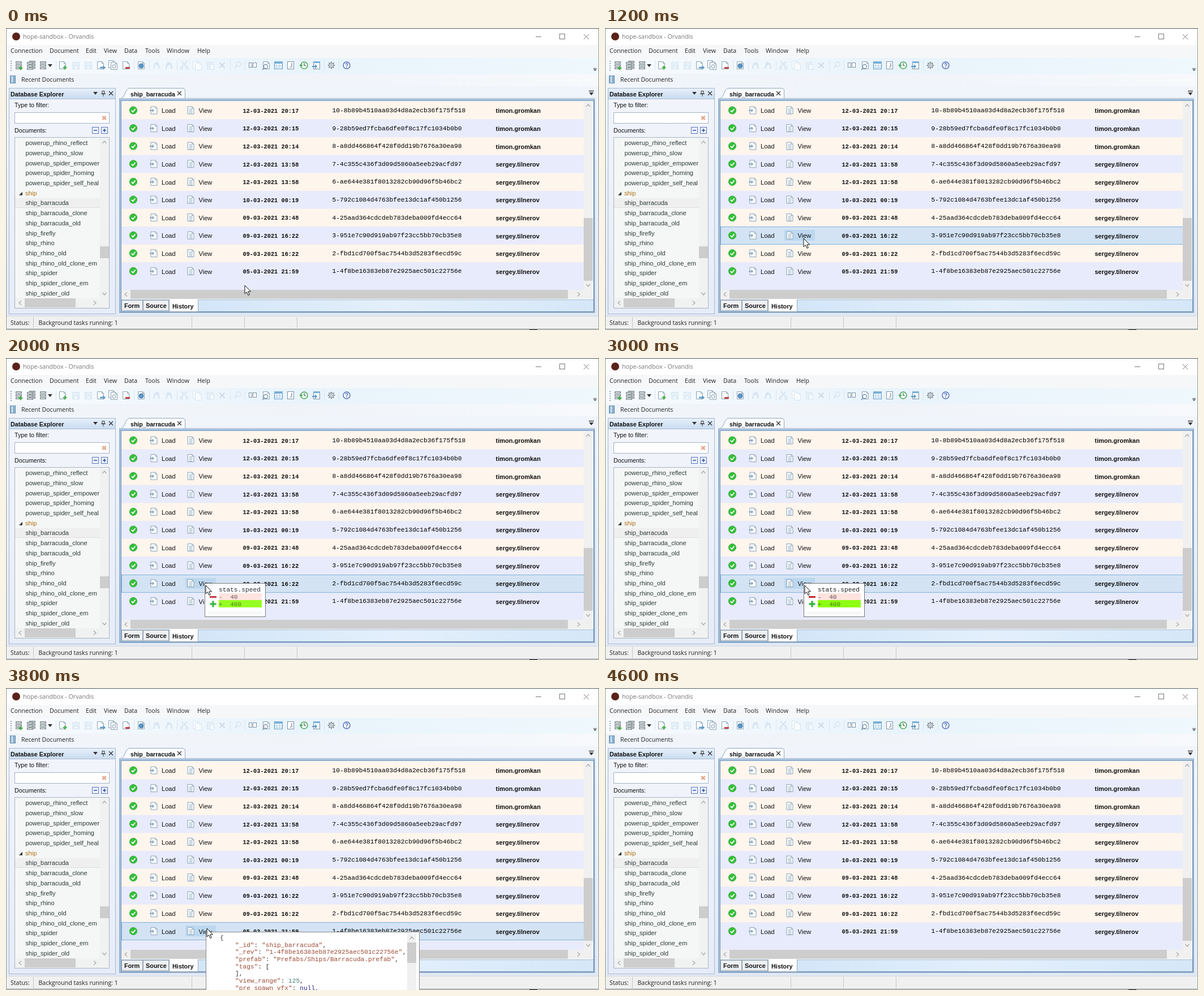
These frames come from a looping animation (1048 px wide and 534 px high, 4.8 s). An HTML page with a canvas:

```html
<!DOCTYPE html>
<html lang="en">
<head>
<meta charset="utf-8">
<title>Document history</title>
<style>
html, body { margin: 0; width: 100%; height: 100%; overflow: hidden; background: #fff; }
canvas { display: block; width: 1048px; height: 534px; }
</style>
</head>
<body>
<canvas id="stage" width="1048" height="534"></canvas>
<script>
const ctx = document.getElementById('stage').getContext('2d', { alpha: false });
const ARIAL = '"Liberation Sans", Arial, sans-serif';
const UI = '"Open Sans", "Noto Sans", sans-serif';
const MONO = '"Liberation Mono", "Courier New", monospace';
const LOOP = 4800, STEP = 200;
const ROW_TOP = 130, ROW_H = 31.6;

const tree = ['powerup_rhino_reflect', 'powerup_rhino_slow', 'powerup_spider_empower',
  'powerup_spider_homing', 'powerup_spider_self_heal', 'ship', 'ship_barracuda',
  'ship_barracuda_clone', 'ship_barracuda_old', 'ship_firefly', 'ship_rhino', 'ship_rhino_old',
  'ship_rhino_old_clone_em', 'ship_spider', 'ship_spider_clone_em', 'ship_spider_old'];

const history = [
  ['12-03-2021 20:17', '10-8b89b4510aa03d4d8a2ecb36f175f518'],
  ['12-03-2021 20:15', '9-28b59ed7fcba6dfe0f8c17fc1034b0b0'],
  ['12-03-2021 20:14', '8-a8dd466864f428f0dd19b7676a30ea98'],
  ['12-03-2021 13:58', '7-4c355c436f3d09d5860a5eeb29acfd97'],
  ['12-03-2021 13:58', '6-ae644e381f8013282cb90d96f5b46bc2'],
  ['10-03-2021 00:19', '5-792c1084d4763bfee13dc1af450b1256'],
  ['09-03-2021 23:48', '4-25aad364cdcdeb783deba009fd4ecc64'],
  ['09-03-2021 16:22', '3-951e7c90d919ab97f23cc5bb70cb35e8'],
  ['09-03-2021 16:22', '2-fbd1cd700f5ac7544b3d5283f6ecd59c'],
  ['05-03-2021 21:59', '1-4f8be16383eb87e2925aec501c22756e']
];
const author = i => i < 3 ? 'timon.gromkan' : 'sergey.tilnerov';

function box(x, y, w, h, fill, stroke) {
  if (fill) { ctx.fillStyle = fill; ctx.fillRect(x, y, w, h); }
  if (stroke) {
    ctx.strokeStyle = stroke; ctx.lineWidth = 1;
    ctx.strokeRect(x + .5, y + .5, w - 1, h - 1);
  }
}

// Points come as a flat list x, y, x, y ...
function path(pts, stroke, width = 1, fill) {
  ctx.beginPath();
  for (let i = 0; i < pts.length; i += 2) ctx.lineTo(pts[i], pts[i + 1]);
  if (fill) { ctx.closePath(); ctx.fillStyle = fill; ctx.fill(); }
  if (stroke) { ctx.strokeStyle = stroke; ctx.lineWidth = width; ctx.stroke(); }
}

function disc(x, y, r, fill, stroke, width = 1) {
  ctx.beginPath(); ctx.arc(x, y, r, 0, 7);
  if (fill) { ctx.fillStyle = fill; ctx.fill(); }
  if (stroke) { ctx.strokeStyle = stroke; ctx.lineWidth = width; ctx.stroke(); }
}

// y is the middle of the capital letters
function text(s, x, y, size, color = '#111', family = ARIAL, weight = '') {
  ctx.font = `${weight} ${size}px ${family}`;
  ctx.fillStyle = color;
  ctx.fillText(s, x, y + size * .36);
}

function shade(x0, y0, x1, y1, ...colors) {
  const g = ctx.createLinearGradient(x0, y0, x1, y1);
  colors.forEach((c, i) => g.addColorStop(i / (colors.length - 1), c));
  return g;
}

function chevron(x, y, dx, dy, color = '#a8a8a8') {
  path(dx ? [x - dx, y - 3.5, x + dx, y, x - dx, y + 3.5]
          : [x - 3.5, y - dy, x, y + dy, x + 3.5, y - dy], color, 1.2);
}

function cross(x, y, r, color, width) {
  path([x - r, y - r, x + r, y + r], color, width);
  path([x - r, y + r, x + r, y - r], color, width);
}

function plus(x, y, r, color, width) {
  path([x - r, y, x + r, y], color, width);
  path([x, y - r, x, y + r], color, width);
}

function dropMark(x, y) {
  path([x - 4, y - 2, x + 4, y - 2, x, y + 3], null, 0, '#333');
}

function page(x, y, color = '#8ba3b7', lines) {
  path([x - 5.5, y - 6.5, x + 2.5, y - 6.5, x + 5.5, y - 3.5, x + 5.5, y + 6.5, x - 5.5, y + 6.5, x - 5.5, y - 6.5],
    color, 1, '#f8fbfd');
  path([x + 2.5, y - 6.5, x + 2.5, y - 3.5, x + 5.5, y - 3.5], color);
  if (lines) for (let k = -3; k < 6; k += 2) path([x - 3, y + k + .5, x + 3, y + k + .5], '#a5bbcb');
}

function rack(x, y) {
  for (let k = 0; k < 3; k++) {
    box(x - 5, y - 7 + k * 5, 11, 4, '#b9c3c6', '#7d888c');
    box(x - 3, y - 5 + k * 5, 6, 1, '#f0f4f5');
  }
}

function toolbar() {
  const y = 66, dim = '#d6e5f1', blue = '#5b95c3', slate = '#7d93a5';
  for (let k = 58; k < 76; k += 4) box(8, k, 2, 2, '#9aa8b6');
  rack(22, y); plus(26, 71, 3.5, '#43b143', 2);
  rack(46, y - 1); rack(42, y + 1);
  rack(65, y); dropMark(78, 66);
  for (const x of [88, 226, 253, 302, 396, 422, 562, 588]) box(x, 57, 1, 18, '#d9e5ee');
  page(100, y); plus(104, 70, 3.5, '#43b143', 2);
  for (const x of [123, 145]) {
    box(x - 6, y - 6, 13, 13, '#e5f0f8', dim);
    box(x - 3, y + 1, 7, 6, '#f3f9fd', dim);
  }
  page(167, y); path([166, 70, 175, 70], blue, 2.5); path([171, 67, 175, 70, 171, 73], blue, 1.5);
  page(187, y - 2); page(191, y + 1); disc(191, 68, 3, '#fff', slate);
  page(212, y); path([211, 70.5, 219, 70.5], '#c94040', 3);
  page(239, y); disc(239, 67, 4, '#5c97c9', '#3f77a5');
  for (const [x, d] of [[266, -1], [288, 1]]) {
    path([x - 5, y + 6, x - 3, y - 3, x + 3, y - 3, x + 5, y + 6], dim, 2.5);
    path([x - 3 * d, y - 6, x + 2 * d, y - 3, x - 3 * d, y], dim, 2);
  }
  cross(315, 64, 5, dim, 2); disc(310, 71, 2, null, dim, 1.5); disc(320, 71, 2, null, dim, 1.5);
  page(336, 65, dim); page(340, 68, dim);
  box(355, 60, 11, 13, '#e5f0f8', dim); box(360, 64, 8, 10, '#f3f9fd', dim);
  cross(382, 66, 4.5, '#cddae5', 2);
  disc(411, 64, 4, null, dim, 1.5); path([408, 67, 404, 71], dim, 2);
  box(429, 61, 6, 9, '#fff', slate); box(436, 61, 7, 9, '#fff', slate);
  page(460, y); disc(459, 68, 3.5, '#fff', slate, 1.3); path([456, 71, 453, 74], slate, 1.5);
  box(474, 59, 15, 14, '#f4faff', blue); box(474, 59, 15, 4, '#78b0d9');
  for (const k of [478, 483]) box(k, 63, 1, 10, '#b3d1e5');
  for (const k of [66, 69]) box(475, k, 13, 1, '#b3d1e5');
  box(497, 59, 12, 14, '#fff', slate); path([505, 62, 505, 68, 502, 70], slate, 1.4);
  disc(527, 66, 6, '#f2fff2', '#4fa85e', 1.6); path([527, 62, 527, 66, 530, 67], '#456', 1.2);
  path([519, 66, 524, 66], '#4fa85e', 2.5);
  box(543, 59, 12, 14, '#f4faff', slate); box(543, 59, 12, 3, '#78b0d9');
  path([541, 68, 549, 68], blue, 2); path([546, 65, 549, 68, 546, 71], blue, 1.5);
  for (let a = 0; a < 8; a++) {
    const c = Math.cos(a * Math.PI / 4), s = Math.sin(a * Math.PI / 4);
    path([575 + c * 4, y + s * 4, 575 + c * 6.3, y + s * 6.3], '#8b959c', 2);
  }
  disc(575, y, 4, '#e6edf2', '#8b959c', 1.5); disc(575, y, 1.6, '#fff', '#8b959c');
  disc(602, y, 6, '#f4f8ff', '#4f6cb8', 1.4);
  text('?', 599, y, 10, '#4f6cb8', ARIAL, 'bold');
  path([1038, 71.5, 1044, 71.5], '#555'); path([1038, 73, 1044, 73, 1041, 76], null, 0, '#555');
}

function header() {
  box(0, 0, 1048, 534, '#fff');
  box(0, 0, 1048, 1, '#4c5a5a');
  disc(18, 15, 7, '#5a2219');
  text('hope-sandbox - Orvandis', 30, 15.5, 10.7, '#777', UI);
  box(936, 15, 10, 1, '#777');
  box(978, 10, 10, 10, null, '#777');
  cross(1025.5, 15.5, 4.5, '#777', 1);

  box(0, 30, 1048, 23, '#f6f7f8');
  box(0, 53, 1048, 28, shade(0, 0, 1048, 0, '#f8fbfe', '#e8f3fb', '#eff8fd'));
  box(0, 81, 1048, 22, shade(0, 0, 1048, 0, '#f1f4f8', '#f0f4f9', '#f7f9fc'));
  const menu = { Connection: 8, Document: 77, Edit: 141, View: 173, Data: 209, Tools: 246, Window: 284, Help: 338 };
  for (const name in menu) text(name, menu[name], 40.3, 10.6, '#222', UI);
  toolbar();
  box(7, 84, 10, 14, '#8fb3cf', '#648fb1'); box(10, 85, 2, 12, '#d6e8f4');
  text('Recent Documents', 27, 91.3, 10.6, '#222', UI);
}

function explorer() {
  box(0, 103, 1048, 406, shade(0, 103, 0, 509, '#f1f5fb', '#e1e9f5'));
  box(5, 106, 189, 400, shade(0, 125, 0, 505, '#f2f4fb', '#e6ecf8'), '#a9b9ce');
  box(6, 107, 187, 18, shade(0, 107, 0, 125, '#e6eff9', '#c9dcf0'));
  box(6, 125, 187, 1, '#aabdd4');
  text('Database Explorer', 8, 117, 10.75, '#111', ARIAL, 'bold');
  dropMark(158, 115);
  path([170, 111.5, 174, 111.5, 174, 116, 170, 116, 170, 111.5], '#333');
  path([168, 116.5, 176, 116.5], '#333'); path([172, 116, 172, 121], '#333');
  cross(185.5, 115.5, 3.5, '#333', 1.3);

  text('Type to filter:', 15, 136.5, 10.7);
  box(15, 149, 168, 20, '#fff', '#a3b2c6');
  cross(173.5, 159, 3.2, '#e7a489', 2.4);
  text('Documents:', 15, 181, 10.7);
  for (const x of [152, 168]) {
    box(x, 175, 12, 12, '#eef4ff', '#5a76bb');
    path([x + 3, 181, x + 9, 181], '#2848a0', 1.4);
  }
  path([174, 178, 174, 184], '#2848a0', 1.4);

  box(15, 193, 168, 303, '#f4f7f5', '#a8b4c2');
  box(16, 301, 150, 17, '#eeefee'); box(16, 317, 150, 1, '#dedfdd');
  ctx.save();
  ctx.beginPath(); ctx.rect(16, 194, 150, 284); ctx.clip();
  tree.forEach((name, i) => {
    const y = 203.4 + i * 17.68;
    if (name === 'ship') {
      path([29, y - 2, 29, y + 4, 23, y + 4], null, 0, '#333');
      text(name, 34, y, 11.1, '#b36f18');
    } else text(name, 34.5, y, 11.1, '#303a3c');
  });
  ctx.restore();
  box(166, 194, 16, 284, '#f0f1f1'); box(166, 386, 16, 21, '#cdcdcd');
  chevron(174, 202, 0, -2); chevron(174, 470, 0, 2);
  box(16, 478, 166, 17, '#f0f1f1'); box(33, 478, 90, 16, '#cdcdcd');
  chevron(25, 486, -2, 0); chevron(157, 486, 2, 0);
}

function row(i, selected) {
  const top = ROW_TOP + i * ROW_H, y = top + 15.8;
  box(204, top, 817, ROW_H, i % 2 ? '#e8ebfb' : '#fef5ec');
  if (selected) {
    const t = Math.round(top);
    box(204, t, 818, 32, '#d3e3f4', '#7fb2da');
    box(317, t + 6, 54, 19, '#bcd8ef');
  }
  disc(225, y - .3, 6.6, '#36bf3b', '#2ca535', .8);
  path([221.7, y, 224.2, y + 2.6, 228.5, y - 2.6], '#fff', 1.8);
  page(261.5, y - .3);
  path([254, y, 261, y], '#7d9cb5', 1.6); path([258.5, y - 2.5, 261, y, 258.5, y + 2.5], '#7d9cb5', 1.2);
  page(326.5, y - .3, '#8ba3b7', true);
  text('Load', 275, y + .5, 11.1);
  text('View', 340.5, y + .5, 11.1);
  text(history[i][0], 418.5, y + .2, 10.3, '#111', MONO, 'bold');
  text(history[i][1], 576.5, y - .8, 11.22, '#000', MONO);
  text(author(i), 865.5, y + .7, 11, '#111', ARIAL, 'bold');
}

function editor(selected) {
  path([203, 125, 208, 121, 213, 110, 217, 106.5, 313, 106.5, 316.5, 109, 316.5, 125], '#8fa6c0', 1, '#fbfdff');
  text('ship_barracuda', 220, 117.3, 10.6, '#111', ARIAL, 'bold');
  cross(306.5, 115.5, 3.5, '#333', 1.3);
  path([1030, 111.5, 1039, 111.5], '#333', 1.4); dropMark(1034.5, 116);

  box(200, 124, 841, 380, '#d3e3f4', '#a3b9d2');
  box(201, 126, 839, 377, '#bdd4ec', '#86a4c5');
  box(203, 128, 836, 374, '#fff', '#6e91b6');
  box(204, 130, 817, 333, '#e8ebfb');
  for (let i = 0; i < history.length; i++) if (i !== selected) row(i);
  if (selected >= 0) row(selected, true);

  box(1021, 130, 16, 333, '#f0f0f0'); box(1021, 336, 16, 111, '#cdcdcd');
  chevron(1029, 137, 0, -2); chevron(1029, 455, 0, 2);
  box(204, 463, 833, 16, '#f0f0f0'); box(220, 463, 773, 16, '#cdcdcd');
  chevron(212, 471, -2, 0); chevron(1012, 471, 2, 0);

  box(204, 480, 834, 21, shade(340, 0, 1038, 0, '#d3e6f8', '#e3effb', '#d5e7f8'));
  box(204, 480, 834, 1, '#a3b9d0');
  box(204, 481, 38, 19, '#eef0f2', '#9aa7b5');
  box(242, 481, 46, 19, '#eef0f2', '#9aa7b5');
  box(288, 480, 52, 22, '#fff', '#9aa7b5');
  box(289, 480, 50, 1, '#fff');
  text('Form', 209, 491, 10.9, '#111', ARIAL, 'bold');
  text('Source', 247, 491, 10.9, '#111', ARIAL, 'bold');
  text('History', 294, 492, 10.9, '#111', ARIAL, 'bold');
}

function statusBar() {
  box(0, 509, 1048, 23, '#f0f0f0');
  box(0, 509, 1048, 1, '#d3d7dd');
  for (const x of [48, 328, 421, 514]) box(x, 511, 1, 20, '#c8c8c8');
  text('Status:', 8, 521.5, 10.6, '#222', UI);
  text('Background tasks running: 1', 57.5, 521.5, 10.6, '#222', UI);
  box(0, 532, 1048, 1, '#687272');
  box(0, 533, 1048, 1, '#e4e6e6');
  box(925, 533, 14, 1, '#333');
  for (const x of [0, 1047]) box(x, 1, 1, 532, '#8f9898');
}

function diffTip(x, y, w, before, after) {
  box(x, y, w, 60, '#fff', '#767676');
  box(x + 6, y + 50, w - 12, 5, '#f7f7f7');
  text('stats.speed', x + 25, y + 10.5, 11.2, '#222', MONO);
  box(x + 25, y + 18, 76, 12, '#ffe3df');
  box(x + 25, y + 30, 76, 13, '#8eff12');
  box(x + 9, y + 23, 12, 3, '#c3242f');
  plus(x + 15, y + 37, 5.5, '#35b43e', 3.4);
  text('-  ' + before, x + 25, y + 24, 11.2, '#63504e', MONO);
  text('+  ' + after, x + 25, y + 36.5, 11.2, '#3f7a18', MONO);
}

function jsonPopup() {
  box(353, 431, 378, 110, '#fdfdfd', '#8a8a8a');
  box(359, 434, 350, 100, '#fff');
  const brown = '#9c4a35', adv = 6.72;
  const lines = [['{'], ['', '"_id": ', '"ship_barracuda"'], ['', '"_rev": ', '"1-4f8be16383eb87e2925aec501c22756e"'],
    ['', '"prefab": ', '"Prefabs/Ships/Barracuda.prefab"'], ['', '"tags": ['], ['],'],
    ['', '"view_range": ', '125'], ['', '"pre_spawn_vfx": ', 'null']];
  lines.forEach(([plain, key, value], i) => {
    const y = 441 + i * 12.65, x = i ? 405 : 378;
    if (plain) return text(plain, x, y, 11.2, '#333', MONO);
    const name = key.replace(/: .*$/, ''), rest = key.slice(name.length);
    text(name, x, y, 11.2, brown, MONO);
    text(rest, x + name.length * adv, y, 11.2, '#333', MONO);
    if (!value) return;
    const color = value === 'null' ? '#26268c' : value[0] === '"' ? brown : '#3f7f78';
    text(value, x + key.length * adv, y, 11.2, color, MONO);
    text(',', x + (key.length + value.length) * adv, y, 11.2, '#333', MONO);
  });
  box(709, 434, 16, 100, '#f0f0f0'); box(709, 450, 16, 36, '#cdcdcd');
  chevron(717, 442, 0, -2);
}

function cursor(x, y) {
  path([x, y, x, y + 15, x + 3.4, y + 11.8, x + 6, y + 17.5, x + 8.3, y + 16.4,
    x + 5.8, y + 11, x + 10.5, y + 11, x, y], '#111', 1, '#fff');
}

// Each scene holds from its start time until the next one
const scenes = [
  { at: 0, mouse: [422, 455] },
  { at: 200, mouse: [374, 387] },
  { at: 400, mouse: [354, 373], row: 7 },
  { at: 600, mouse: [351, 372], row: 7 },
  { at: 1400, mouse: [351, 372], row: 7, tip: [351, 373, 110, 400, 40], alpha: .9 },
  { at: 1600, mouse: [351, 372], row: 7, tip: [351, 373, 110, 400, 40] },
  { at: 2000, mouse: [353, 402], row: 8, tip: [351, 398, 108, 40, 400], alpha: .93 },
  { at: 2200, mouse: [353, 402], row: 8, tip: [351, 398, 108, 40, 400] },
  { at: 3200, mouse: [355, 425], row: 9, json: true, alpha: .75 },
  { at: 3400, mouse: [355, 425], row: 9, json: true },
  { at: 4000 }
];

function draw(t) {
  const s = scenes.filter(c => c.at <= t).pop();
  header();
  explorer();
  editor(s.row ?? -1);
  statusBar();
  ctx.globalAlpha = s.alpha ?? 1;
  if (s.tip) diffTip(...s.tip);
  if (s.json) jsonPopup();
  ctx.globalAlpha = 1;
  if (s.mouse) cursor(...s.mouse);
}

let last = -1;
const start = performance.now();
function tick() {
  const step = Math.floor(((performance.now() - start) % LOOP) / STEP);
  if (step !== last) draw((last = step) * STEP);
  requestAnimationFrame(tick);
}
tick();
</script>
</body>
</html>
```
